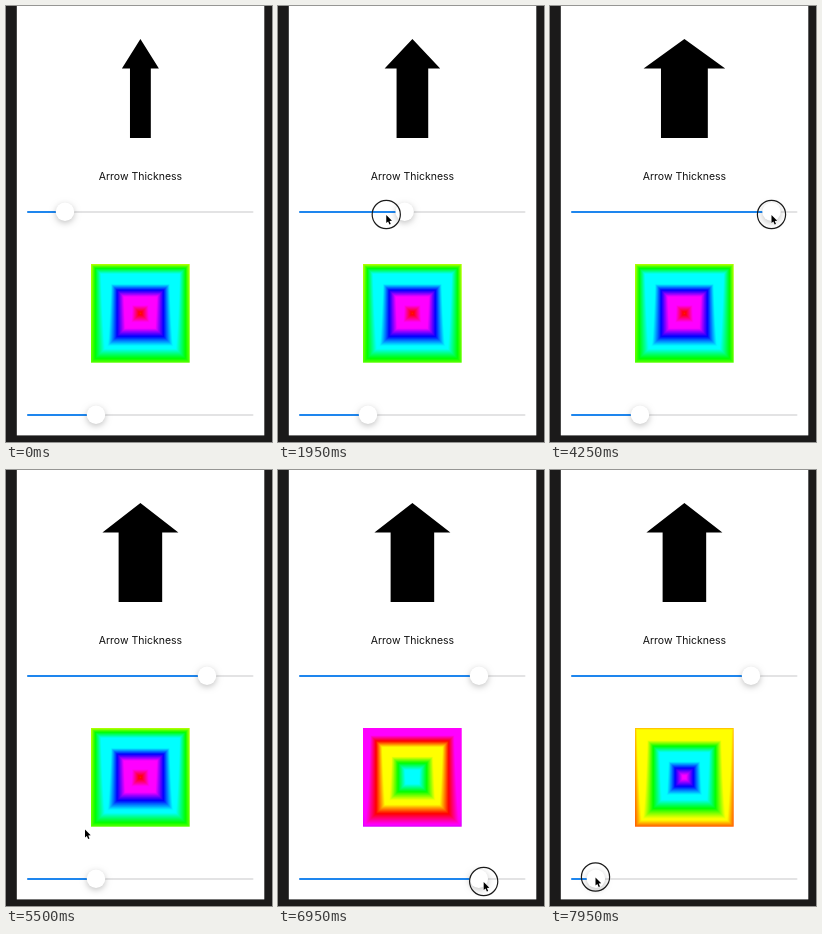
Animation of 266x436 px, one loop 8000 ms. Source, as an HTML page with a canvas:

```html
<!DOCTYPE html>
<html lang="en">
<head>
<meta charset="utf-8">
<title>Arrow Thickness</title>
<style>
  html, body { margin: 0; width: 100%; height: 100%; overflow: hidden; background: #1b1a1a; }
  canvas { display: block; }
</style>
</head>
<body>
<canvas id="stage" width="266" height="436"></canvas>
<script>
const ctx = document.getElementById('stage').getContext('2d');
const LOOP = 8000;
const LAG = 50; // knobs trail the pointer
const CX = 134.4;
const PT = 0.66; // pixels per point
const KNOB = 14 * PT;
const TRACK = { left: 21, right: 247.5 };
const SQUARE = { x: 85, y: 258, size: 98.7 };

const thickness = { y: 206, grab: 1100, release: 5000 };
const hue = { y: 409, grab: 6100, release: LOOP };

// The pointer eases from stop to stop, resting in between.
const home = { x: 215, y: 257 };
const moves = [
  { from: 250, to: 1050, x: 59, y: 208.5 },
  { from: 1120, to: 1500, x: 172 },
  { from: 1690, to: 2240, x: 34 },
  { from: 3080, to: 3230, x: 131.5 },
  { from: 3270, to: 3950, x: 221.5 },
  { from: 4600, to: 4950, x: 201 },
  { from: 5270, to: 5500, x: 79, y: 359 },
  { from: 5500, to: 6050, x: 90, y: 411.5 },
  { from: 6330, to: 6610, x: 171.5 },
  { from: 6640, to: 7000, x: 207.5 },
  { from: 7250, to: 7920, x: 45.5, y: 407 },
];

const clamp = (v, lo, hi) => Math.min(hi, Math.max(lo, v));
const ease = u => u * u * (3 - 2 * u);

function pointerAt(t) {
  let { x, y } = home;
  for (const m of moves) {
    const k = ease(clamp((t - m.from) / (m.to - m.from), 0, 1));
    x += (m.x - x) * k;
    y += ((m.y ?? y) - y) * k;
  }
  return { x, y };
}

function knobAt(slider, t) {
  const { x } = pointerAt(clamp(t - LAG, slider.grab, slider.release));
  return clamp(x, TRACK.left + KNOB, TRACK.right - KNOB);
}

function path(points) {
  ctx.beginPath();
  points.forEach(([x, y]) => ctx.lineTo(x, y));
  ctx.closePath();
}

function disc(x, y, radius) {
  ctx.beginPath();
  ctx.arc(x, y, radius, 0, 2 * Math.PI);
}

// Fully saturated hue; brightness above 1 clips each channel.
function vivid(h, brightness) {
  const channel = shift => {
    const k = (h * 6 + shift) % 6;
    const c = 1 - clamp(Math.min(k, 4 - k), 0, 1);
    return Math.round(255 * Math.min(1, c * brightness));
  };
  return `rgb(${channel(5)},${channel(3)},${channel(1)})`;
}

function drawArrow(knob) {
  const head = 10.4 + knob * 0.1373;
  const shaft = 5.7 + knob * 0.08;
  ctx.fillStyle = '#000';
  path([[CX, 33], [CX + head, 62.6], [CX + shaft, 62.6], [CX + shaft, 132],
    [CX - shaft, 132], [CX - shaft, 62.6], [CX - head, 62.6]]);
  ctx.fill();
}

// Nested squares step through the hues, brighter towards the top.
function drawSquare(knob) {
  const { x, y, size } = SQUARE;
  const amount = (knob - 33) / 208;
  for (let ring = 0; ring < 75; ring++) {
    const inset = ring * PT;
    const shade = ctx.createLinearGradient(0, y, 0, y + size);
    for (let s = 0; s <= 1; s += 0.125) {
      shade.addColorStop(s, vivid(amount + ring / 100, 2 - s));
    }
    ctx.fillStyle = shade;
    ctx.fillRect(x + inset, y + inset, size - 2 * inset, size - 2 * inset);
  }
}

function drawSlider(y, knob) {
  const bar = (end, color) => {
    ctx.fillStyle = color;
    ctx.beginPath();
    ctx.roundRect(TRACK.left, y - 1, end - TRACK.left, 2, 1);
    ctx.fill();
  };
  bar(TRACK.right, '#e3e3e4');
  bar(knob, '#1e86ee');
  ctx.save();
  ctx.shadowColor = 'rgba(0,0,0,0.24)';
  ctx.shadowBlur = 6;
  ctx.shadowOffsetY = 2;
  ctx.fillStyle = '#fff';
  disc(knob, y - 0.3, KNOB);
  ctx.fill();
  ctx.restore();
}

function drawPointer(t) {
  const { x, y } = pointerAt(t);
  if ([thickness, hue].some(s => t >= s.grab && t < s.release)) {
    ctx.strokeStyle = '#1a1a1a';
    ctx.lineWidth = 1.2;
    disc(x, y, 14.1);
    ctx.stroke();
  }
  ctx.save();
  ctx.translate(x, y + 0.5);
  ctx.scale(0.88, 0.88);
  path([[0, 0], [0, 9.2], [2.1, 7.3], [3.6, 10.8], [5.1, 10.1], [3.7, 6.8], [6.5, 6.6]]);
  ctx.strokeStyle = '#fff';
  ctx.lineWidth = 1;
  ctx.stroke();
  ctx.fillStyle = '#000';
  ctx.fill();
  ctx.restore();
}

function draw(t) {
  ctx.fillStyle = '#1b1a1a';
  ctx.fillRect(0, 0, 266, 436);
  ctx.fillStyle = '#fff';
  ctx.fillRect(10.8, 0, 247.5, 429.4);

  const thickKnob = knobAt(thickness, t);
  const hueKnob = knobAt(hue, t);
  drawArrow(thickKnob);
  ctx.fillStyle = '#111';
  ctx.font = '10.5px Inter, Roboto, sans-serif';
  ctx.textAlign = 'center';
  ctx.fillText('Arrow Thickness', CX, 173.8);
  drawSlider(thickness.y, thickKnob);
  drawSquare(hueKnob);
  drawSlider(hue.y, hueKnob);
  if (t >= 50) drawPointer(t);
}

const start = performance.now();
function tick() {
  draw((performance.now() - start) % LOOP);
  requestAnimationFrame(tick);
}
tick();
</script>
</body>
</html>
```
